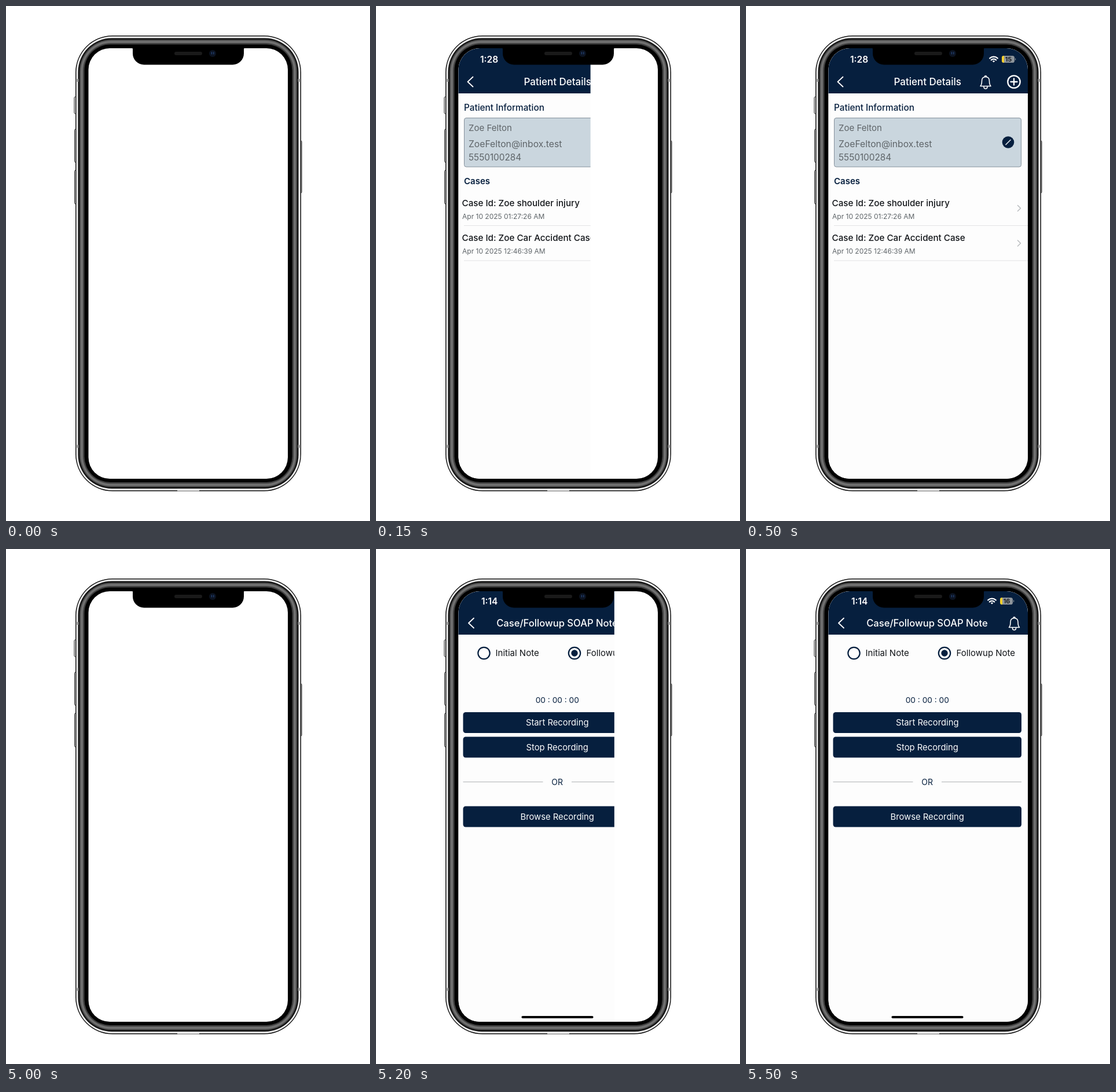
These frames come from a looping animation (629 by 890 pixels, 8000 ms). An HTML page:

```html
<!DOCTYPE html>
<html lang="en">
<head>
<meta charset="utf-8">
<title>Patient app screens</title>
<style>
  html, body { margin: 0; width: 100%; height: 100%; overflow: hidden; background: #fff; }
  svg { display: block; width: 629px; height: 890px; font-family: Inter, "Open Sans", sans-serif; }
  .line { fill: none; stroke-linecap: round; stroke-linejoin: round; }
  .navy { fill: #061f3e; }
  .gray { fill: #5e6468; }
  .white { fill: #fff; }
  .ink { fill: #111418; }
  .mid { text-anchor: middle; }
  .m { font-weight: 500; }
  .b { font-weight: 600; }
</style>
</head>
<body>
<svg viewBox="0 0 629 890">
  <defs>
    <clipPath id="glass"><rect x="142.5" y="73" width="344.5" height="744" rx="37"/></clipPath>
    <clipPath id="wipeA"><rect y="70" width="0" height="750"/></clipPath>
    <clipPath id="wipeB"><rect y="70" width="0" height="750"/></clipPath>

    <path id="back" class="line" d="M4.5-8.5-4.5 0 4.5 8.5" stroke="#fff" stroke-width="1.8"/>
    <path id="next" class="line" d="M-2.5-5 2.5 0-2.5 5" stroke="#b9bcbf" stroke-width="1.5"/>
    <g id="bell" class="line" stroke="#fff" stroke-width="1.6">
      <path d="M-9 6.5C-6.5 4-6.5 1-6.5-2.5-6.5-7-4-9.5 0-9.5S6.5-7 6.5-2.5C6.5 1 6.5 4 9 6.5Z"/>
      <path d="M-1.5-10a1.5 1.5 0 0 1 3 0M-3 7.5a3 3.5 0 0 0 6 0"/>
    </g>
    <g id="wifi" class="line" stroke="#fff" stroke-width="2.2" stroke-linecap="butt">
      <path d="M-6.8-1.6a9.8 9.8 0 0 1 13.6 0M-4.2 1.4a6 6 0 0 1 8.4 0"/>
      <path d="M0 5.5-2.2 3.2a3.2 3.2 0 0 1 4.4 0Z" fill="#fff" stroke="none"/>
    </g>
    <g id="battery">
      <rect x="-11.5" y="-6" width="22" height="12" rx="3.6" fill="#8d949b"/>
      <path d="M-7.5-6h-.6a3.4 3.4 0 0 0-3.4 3.4v5.2a3.4 3.4 0 0 0 3.4 3.4h.6Z" fill="#f7d02c"/>
      <path d="M11.5-2a2.2 2.2 0 0 1 0 4Z" fill="#8d949b"/>
    </g>
  </defs>

  <g id="buttons" fill="#f2f2f2" stroke="#111"></g>
  <g id="rings"></g>
  <path d="M121 128.5h4.500M504.500 128.500h4.500M121 761h4.500M504.500 761h4.500" stroke="#999" stroke-width="5"/>
  <path d="M296 837.500h38" stroke="#ccc" stroke-width="1.500"/>

  <g clip-path="url(#glass)">
    <g clip-path="url(#wipeA)">
      <rect x="140" y="70" width="350" height="750" fill="#fdfdfd"/>
      <rect class="navy" x="140" y="70" width="350" height="81"/>
      <text class="white b" x="180" y="97.500" font-size="15.500">1:28</text>
      <use href="#wifi" x="428" y="92"/>
      <use href="#battery" x="453.500" y="92"/>
      <text class="ink b mid" x="453.500" y="96" font-size="11">15</text>
      <use href="#back" x="163" y="131"/>
      <text class="white m mid" x="313.700" y="136.500" font-size="17">Patient Details</text>
      <use href="#bell" x="414" y="132"/>
      <g class="line" stroke="#fff" stroke-width="2.300">
        <circle cx="463" cy="131" r="10.700"/>
        <path d="M457.500 131h11M463 125.500v11"/>
      </g>

      <text class="navy m" x="152" y="180.500" font-size="15.300">Patient Information</text>
      <rect x="152.500" y="193.500" width="323" height="84.500" rx="3.500" fill="#cad6de" stroke="#85919c"/>
      <g class="gray">
        <text x="160" y="216" font-size="15">Zoe Felton</text>
        <text x="160" y="243.500" font-size="15.700">ZoeFelton@inbox.test</text>
        <text x="160" y="267" font-size="15.300">5550100284</text>
      </g>
      <circle class="navy" cx="453" cy="235.500" r="10.300"/>
      <path class="line" d="M449 239.500 457 231.500" stroke="#dfe6ea" stroke-width="1.700"/>

      <text class="navy b" x="152" y="307.500" font-size="15">Cases</text>
      <g class="ink m" font-size="15.200">
        <text x="148.500" y="345.500">Case Id: Zoe shoulder injury</text>
        <text x="148.500" y="405.500">Case Id: Zoe Car Accident Case</text>
      </g>
      <g class="gray" font-size="12">
        <text x="149" y="367.500">Apr 10 2025 01:27:26 AM</text>
        <text x="149" y="428">Apr 10 2025 12:46:39 AM</text>
      </g>
      <path d="M152 379.500h335M152 440h335" stroke="#e2e3e4"/>
      <use href="#next" x="472" y="349.500"/>
      <use href="#next" x="472" y="410"/>
    </g>

    <g clip-path="url(#wipeB)">
      <rect x="140" y="70" width="350" height="750" fill="#fdfdfd"/>
      <rect class="navy" x="140" y="70" width="350" height="78"/>
      <text class="white b" x="182" y="95.500" font-size="15.500">1:14</text>
      <use href="#wifi" x="425" y="90"/>
      <use href="#battery" x="450.500" y="90"/>
      <text class="ink b mid" x="450.500" y="94" font-size="11">16</text>
      <use href="#back" x="164.500" y="128"/>
      <text class="white m mid" x="313" y="133.700" font-size="16.600">Case/Followup SOAP Note</text>
      <use href="#bell" x="463.500" y="129"/>

      <g fill="none" stroke="#061f3e" stroke-width="2.200">
        <circle cx="186.500" cy="180" r="10.200"/>
        <circle cx="343" cy="180" r="10.200"/>
      </g>
      <circle class="navy" cx="343" cy="180" r="5.700"/>
      <g class="ink" font-size="15">
        <text x="206.500" y="185.200">Initial Note</text>
        <text x="363.500" y="185.200">Followup Note</text>
      </g>

      <text class="navy mid" x="313.300" y="266" font-size="13.700">00 : 00 : 00</text>
      <g class="navy">
        <rect x="150.500" y="282" width="325.500" height="36" rx="4.500"/>
        <rect x="150.500" y="324.500" width="325.500" height="36" rx="4.500"/>
        <rect x="150.500" y="444.500" width="325.500" height="36" rx="4.500"/>
      </g>
      <g class="white mid" font-size="14.800">
        <text x="313.200" y="305.300">Start Recording</text>
        <text x="313.200" y="347.500">Stop Recording</text>
        <text x="313.200" y="467.500">Browse Recording</text>
      </g>
      <path d="M150.500 402.500h138M338 402.500h138" stroke="#c3c5c8" stroke-width="1.500"/>
      <text class="navy mid" x="313.200" y="407.500" font-size="14">OR</text>
      <path class="line" d="M253.500 809h120" stroke="#000" stroke-width="4.200"/>
    </g>
  </g>

  <path d="M217 71q2 1 2 4v7a19.500 19.500 0 0 0 19.500 19.500h153a19.500 19.500 0 0 0 19.500-19.500v-7q0-3 2-4Z"/>
  <rect x="291" y="79" width="48" height="6" rx="3" fill="#1a1a1a"/>
  <circle cx="357" cy="82" r="6" fill="#0b1220"/>
  <path d="M355.500 79.500v4M358.800 79.500v4" stroke="#23406f" stroke-width="1.500"/>
</svg>

<script>
  const get = id => document.getElementById(id);
  const box = (x, y, w, h, r, fill = "") =>
    `<rect x="${x}" y="${y}" width="${w}" height="${h}" rx="${r}" ${fill && `fill="${fill}"`}/>`;

  // Phone body: nested rounded rectangles from the rim inwards
  const rings = [
    [0, "#111"], [1.5, "#f0f0f0"], [4.5, "#111"], [7, "#484848"],
    [9, "#707070"], [13, "#404040"], [15.5, "#000"]
  ];
  get("rings").innerHTML = rings.map(([d, fill]) =>
    box(120 + d, 51 + d, 390 - 2 * d, 787.5 - 2 * d, 64 - 1.25 * d, fill)).join("") +
    box(142.5, 73, 344.5, 744, 37, "#fff");

  const buttons = [[118, 157, 29], [118.5, 213, 57], [118.5, 284, 58], [506.5, 233, 90]];
  get("buttons").innerHTML = buttons.map(([x, y, h]) => box(x, y, 4.5, h, 1.5)).join("");

  const LOOP = 8000, SECOND = 5000, WIPE = 500, STEP = 50, SPAN = 348;
  const easeOut = u => 1 - (1 - u) ** 3;
  const setEdge = (id, x) => get(id).firstElementChild.setAttribute("width", x);
  const edge = (start, t) => start + SPAN * easeOut(Math.min(t / WIPE, 1));

  function draw(now) {
    const t = Math.floor(now % LOOP / STEP) * STEP;
    const first = t < SECOND;
    setEdge("wipeA", first ? edge(142, t) : 0);
    setEdge("wipeB", first ? 0 : edge(139, t - SECOND));
    requestAnimationFrame(draw);
  }
  draw(performance.now());
</script>
</body>
</html>
```
